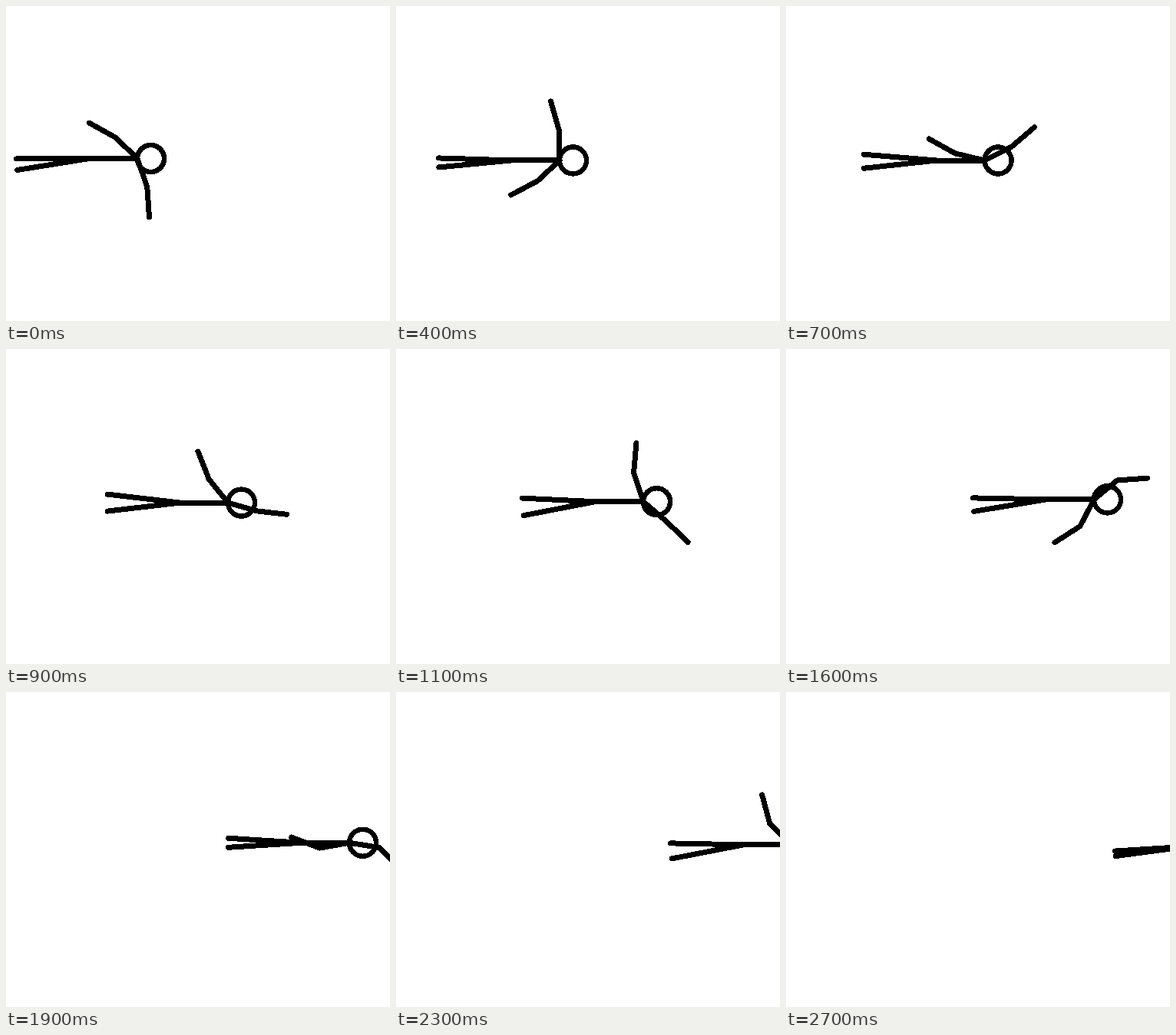
An HTML page for the animation above (2800 ms loop, 500 px wide and 410 px high).

```html
<!DOCTYPE html>
<html lang="en">
<head>
<meta charset="utf-8">
<title>Swimmer</title>
<style>
  html, body { margin: 0; width: 100%; height: 100%; overflow: hidden; background: #fff; }
  svg { display: block; width: 500px; height: 410px; }
  path, circle { fill: none; stroke: #000; stroke-linecap: round; stroke-linejoin: round; }
</style>
</head>
<body>
<svg viewBox="0 0 500 410" shape-rendering="crispEdges">
  <path id="limbs" stroke-width="7"/>
  <circle id="head" r="17.5" stroke-width="6.5"/>
</svg>
<script>
const STEP = 100, STEPS = 28;
const TORSO = 62.5, LEG = 95, ARM = 39.2, HEAD = 17.5;

// Key poses: step, shoulder x, near and far arm angle, drop of each foot.
const poses = [
  [0, 171, 224, 71, 0.5, 15],
  [4, 213, 269, 137, -3, 9],
  [9, 289, 376, 231, -11, 11],
  [13, 355, 425, 272, 2, 25],
  [19, 447, 530, 369, -6, 6],
  [23, 515, 584, 430, -2, 18],
  [27, 586, 640, 500, 6, 12.5],
];

const mix = (a, b, k) => a + (b - a) * k;
const limb = (length, degrees) => {
  const r = degrees * Math.PI / 180;
  return `l${length * Math.cos(r)} ${length * Math.sin(r)}`;
};

function poseAt(step) {
  const i = Math.max(1, poses.findIndex(pose => pose[0] >= step));
  const from = poses[i - 1], to = poses[i];
  const k = (step - from[0]) / (to[0] - from[0]);
  return from.map((v, j) => mix(v, to[j], k));
}

const limbs = document.getElementById('limbs');
const head = document.getElementById('head');

function draw(now) {
  const step = Math.floor(now / STEP) % STEPS;
  const [, x, near, far, ...drops] = poseAt(step);
  const y = 198.5 + 2.7 * Math.sin(2 * Math.PI * step / 22.5);
  const shoulder = `M${x} ${y}`, hip = `M${x - TORSO} ${y}`;

  // Both elbows swing from their first bend to their second mid-loop.
  const swing = (1 + Math.tanh((step - 11.5) / 2.5)) / 2;
  const arm = (angle, bend) => shoulder + limb(ARM, angle) + limb(ARM, angle + bend);
  const leg = drop => hip + limb(LEG, 180 - Math.asin(drop / LEG) * 180 / Math.PI);

  limbs.setAttribute('d', `${shoulder}h${-TORSO}` + drops.map(leg).join('') +
    arm(near, mix(-15, 31, swing)) + arm(far, mix(15, 36, swing)));
  head.setAttribute('cx', x + HEAD);
  head.setAttribute('cy', y);
}

function tick() {
  draw(performance.now());
  requestAnimationFrame(tick);
}
tick();
</script>
</body>
</html>
```
